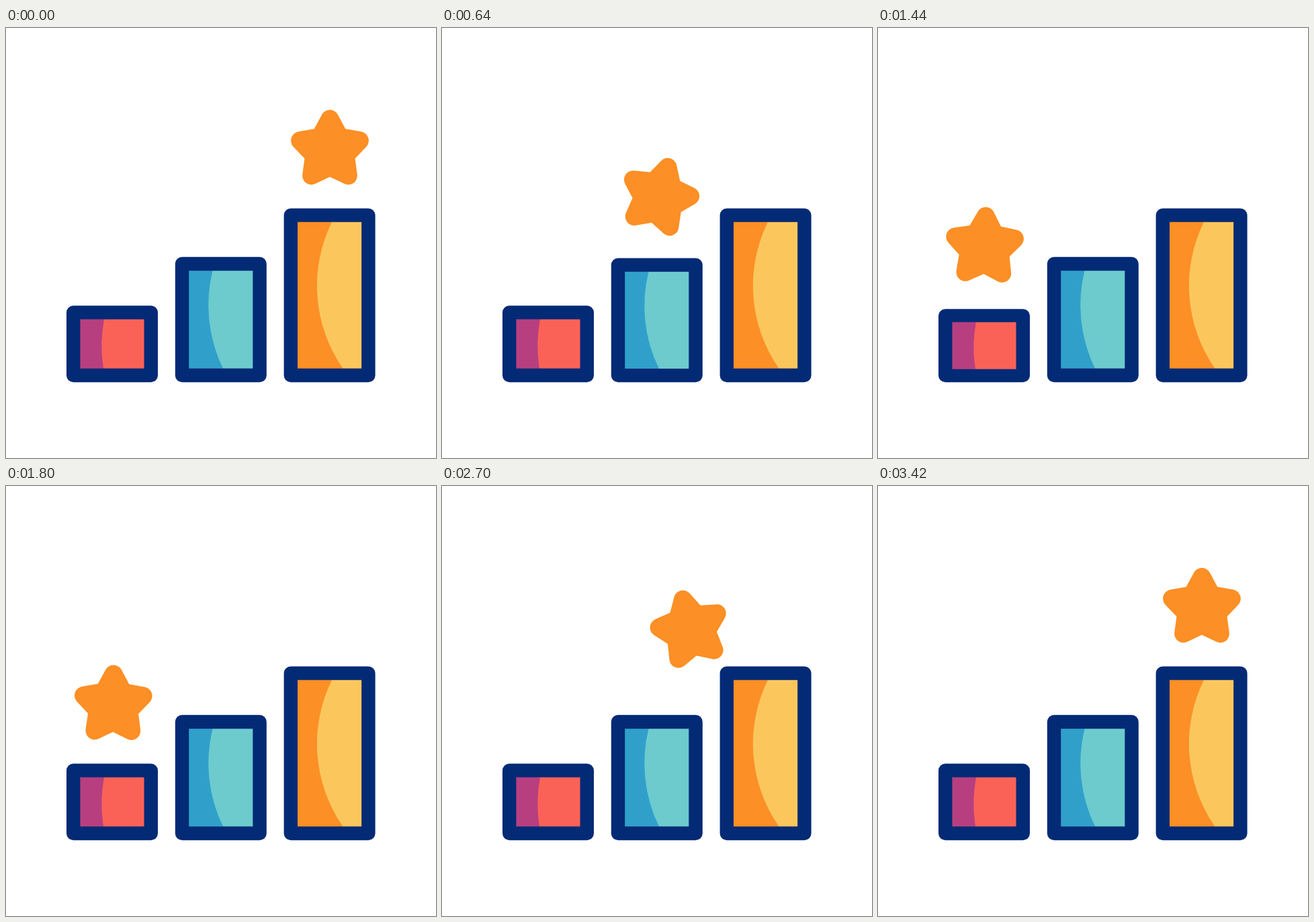
Animation, 640 px wide and 640 px high, one loop 3600 ms. Source, as an HTML page:

```html
<!DOCTYPE html>
<html lang="en">
<head>
<meta charset="utf-8">
<title>Star hopping over bars</title>
<style>
  html, body { margin: 0; width: 100%; height: 100%; overflow: hidden; background: #fff; }
  svg { display: block; width: 100vw; height: 100vh; }
  .frame { fill: none; stroke: #032a75; stroke-width: 20.4; stroke-linejoin: round; }
  #star { fill: #fc8f25; stroke: #fc8f25; stroke-width: 27; stroke-linejoin: round; }
</style>
</head>
<body>
<svg viewBox="0 0 640 640"><g id="bars"></g><path id="star"/></svg>
<script>
const LOOP = 3600, HOP = 500;
const STEP_X = 161.8, STEP_Y = 72.4;      // from one bar to the next
const BASE = 517, WIDTH = 115.6, EDGE = 10.2;
const HOME = { x: 482, y: 182 };          // star above the tallest bar
const OVER = { x: 32, y: 71 };            // how far the last throw goes past it

// Each fill is split by an arc from x = top to x = foot.
const bars = [
  { dark: '#b73f80', light: '#fb6257', top: 146, foot: 145 },
  { dark: '#30a0cb', light: '#6dcbce', top: 307.5, foot: 323 },
  { dark: '#fc8f25', light: '#fbc75d', top: 485, foot: 501.5 }
].map((bar, i) => ({ ...bar, x: 100.2 + STEP_X * i, y: 423.4 - STEP_Y * i, landings: [] }));

// Hops: down, down, up, up.
const [down1, down2, up1, up2] = [205, 963, 1790, 2548];
bars[0].landings = [down2 + 395];
bars[1].landings = [down1 + 395, up1 + 395];
bars[2].landings = [3220];

const phase = (t, start, length) => Math.min(1, Math.max(0, (t - start) / length));
const smooth = (t, start, length = HOP) => {
  const u = phase(t, start, length);
  return u * u * (3 - 2 * u);
};
// Quick start, long soft stop.
const glide = (t, start, length = HOP) =>
  1 - (1 - phase(t, start, length) ** 1.5) ** 2.4;
const press = (t, start) => 4.5 * Math.sin(Math.PI * phase(t, start, 200)) ** 2;

function starPose(t) {
  const a = glide(t, down1), b = glide(t, down2);
  const lift = 175 * a * (1 - a) ** 2;
  const x = HOME.x + STEP_X * (glide(t, up1) - a - b)
    + (STEP_X + OVER.x) * glide(t, up2 - 23, 743)
    - OVER.x * smooth(t, 3180, 230);
  const y = HOME.y - lift + STEP_Y * (a * a + b * b - smooth(t, up1, 340))
    - (STEP_Y + OVER.y) * smooth(t, up2 + 15, 395)
    + OVER.y * smooth(t, 2960, 420);
  const turns = smooth(t, up1) + smooth(t, up2, 600) - smooth(t, down1) - smooth(t, down2);
  return `translate(${x} ${y}) rotate(${360 * turns})`;
}

const star = document.getElementById('star');
star.setAttribute('d', 'M' + Array.from({ length: 10 }, (_, i) => {
  const r = i % 2 ? 24.5 : 46.6, a = i * Math.PI / 5;
  return `${r * Math.sin(a)} ${-r * Math.cos(a)}`;
}).join('L') + 'Z');

const group = document.getElementById('bars');
group.innerHTML = bars.map(({ x, y, dark, light, top, foot }) => {
  const box = `x="${x}" y="${y}" width="${WIDTH}" height="${BASE - y}"`;
  return `<g><rect ${box} fill="${dark}"/>
    <path d="M${top} ${y + EDGE}A215 215 0 0 0 ${foot} ${BASE - EDGE}H${x + WIDTH - EDGE}V${y + EDGE}Z" fill="${light}"/>
    <rect ${box} class="frame"/></g>`;
}).join('');

function draw(now) {
  const t = now % LOOP, floor = BASE + EDGE;
  bars.forEach(({ y, landings }, i) => {
    const sink = landings.reduce((sum, start) => sum + press(t, start), 0);
    const scale = 1 - sink / (BASE - y);
    group.children[i].setAttribute('transform',
      `translate(0 ${floor * (1 - scale)}) scale(1 ${scale})`);
  });
  star.setAttribute('transform', starPose(t));
  requestAnimationFrame(draw);
}
draw(0);
</script>
</body>
</html>
```
